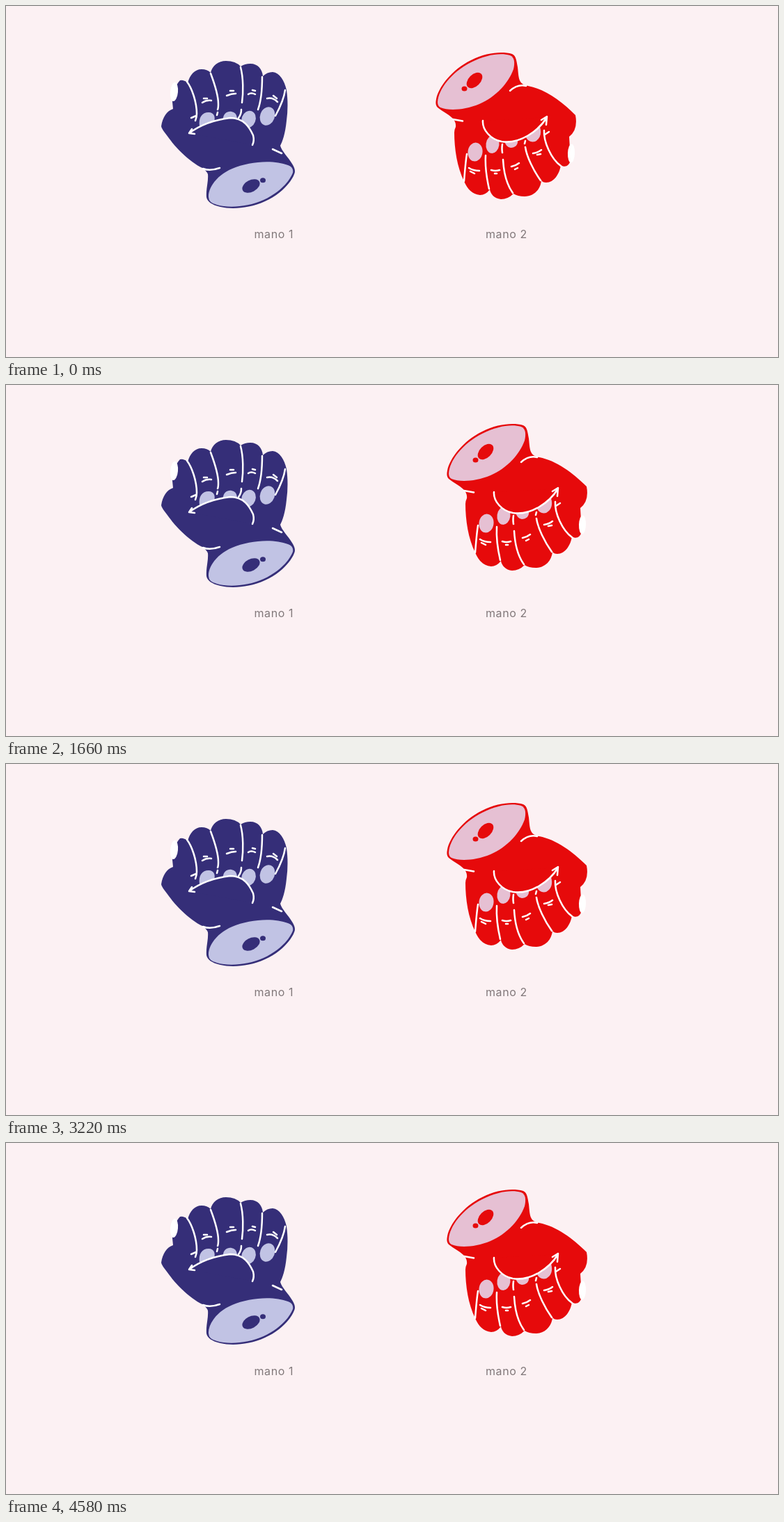
An HTML page that plays this animation: 1109x505 px, repeating every 4610 ms.

```html
<!DOCTYPE html>
<html lang="es">
<head>
<meta charset="utf-8">
<title>Manos</title>
<style>
html, body { margin: 0; width: 100%; height: 100%; overflow: hidden; background: #fcf1f3; }
svg { display: block; width: 1109px; height: 505px; }
.line { fill: none; stroke: #fff; stroke-width: 2.5; stroke-linecap: round; stroke-linejoin: round; }
.nail { fill: #fff; }
#blue { fill: #352e78; }
#blue .skin { fill: #c1c3e4; }
#red { fill: #e60a0b; }
#red .skin { fill: #e6c0d3; }
text { font: 400 16px Inter, sans-serif; letter-spacing: .6px; fill: #81787a; }
</style>
</head>
<body>
<svg viewBox="0 0 1109 505">
  <g id="blue">
    <path d="M250 107Q257 106 261 111C264 99 271 91 281 91Q289 91 294 96C296 86 305 79 316 79Q330 79 337 87Q343 83 351 83C362 83 368 91 369 101Q375 95 383 95C393 96 400 107 403 121C405 135 405 150 403 165C401 185 397 195 394 201C396 209 406 218 411 227C415 233 416 238 414 242C410 253 395 271 372 281C350 291 325 293 308 289C295 286 289 281 288 275C287 264 291 252 290 242Q288 237 282 233C265 225 245 205 237 194C229 183 224 178 223 173C225 160 231 151 240 148L239 138C240 125 244 113 250 107Z"/>
    <ellipse class="nail" cx="241.500" cy="123.500" rx="5.500" ry="13.500" transform="rotate(5 241.500 123.500)"/>
    <path class="skin" d="M291 275C290 262 303 243 325 234C350 223 385 221 405 229C411 231 413 235 412 240C407 253 392 269 370 279C348 289 320 291 303 286Q291 283 291 275Z"/>
    <ellipse cx="352" cy="259" rx="13.500" ry="8.500" transform="rotate(-28 352 259)"/>
    <ellipse cx="369" cy="250.700" rx="4" ry="3.500"/>
    <g class="skin">
      <path d="M278 173C276 160 282 153 291 153C299 153 301 160 299 166Z"/>
      <path d="M312 162C312 155 318 151 324 152Q331 153 332 161L324 164Z"/>
      <ellipse cx="348.500" cy="163" rx="10" ry="12.500" transform="rotate(20 348.500 163)"/>
      <ellipse cx="375.500" cy="158.500" rx="10.500" ry="13.500" transform="rotate(20 375.500 158.500)"/>
    </g>
    <path d="M263 183C282 169 305 163 322 161C342 161 350 175 355 186Q357 194 354 200Z"/>
    <g class="line">
      <path d="M263 183C282 169 305 163 322 161C342 161 350 175 355 186Q357 194 354 200M267 177L263 183L271 184"/>
      <path d="M260 109C267 118 274 138 274 155Q274 160 272 165M266 161L273 158"/>
      <path d="M294 97C300 113 305 130 305 141Q305 147 304 149M304 153L303 157M337 88C341 103 341 125 339 139M338 149Q338 156 334 161"/>
      <path d="M368 102C368 120 366 138 362 149M401 121C399 135 393 147 387 158"/>
      <path d="M282 139Q288 135 295 136M284 133L289 133M317 129Q324 126 330 126M322 122L327 122M348 127Q352 124 358 127M354 121L358 122M375 133Q383 131 390 138M384 129L389 133"/>
      <path d="M383 206L396 212M283 234Q293 238 307 233"/>
    </g>
  </g>
  <g id="red">
    <path d="M620 146C617 143 617 139 618 134C621 117 641 91 668 78C690 67 712 65 727 69C733 72 733 78 735 88C736 97 736 104 739 109Q742 114 750 115C775 120 798 137 818 157Q822 178 809 188L811 222C809 230 803 233 797 229C795 242 787 254 776 254Q771 254 769 251C768 264 758 274 745 274Q735 274 729 270Q721 278 711 278C701 277 696 270 695 264Q689 272 681 272C669 271 662 262 658 252C648 232 644 205 644 182Q644 178 646 174Q647 167 641 161C635 155 627 152 620 146Z"/>
    <ellipse class="nail" cx="812" cy="212" rx="5" ry="13.500" transform="rotate(2 812 212)"/>
    <path class="skin" d="M620 138C621 120 640 95 668 81C690 70 710 67 724 71C731 74 731 82 729 91C722 110 705 130 680 141C658 150 636 151 624 146Q620 144 620 138Z"/>
    <ellipse cx="673" cy="107" rx="13.500" ry="8.500" transform="rotate(-45 673 107)"/>
    <ellipse cx="658.500" cy="119" rx="4" ry="3.500"/>
    <g class="skin">
      <ellipse cx="674" cy="210" rx="10.500" ry="13.500" transform="rotate(8 674 210)"/>
      <ellipse cx="699" cy="199" rx="9.500" ry="13" transform="rotate(8 699 199)"/>
      <path d="M716 194L735 193C736 200 731 204 725 204Q718 203 716 194Z"/>
      <path d="M747 189L767 174C770 184 767 191 760 195Q751 197 747 189Z"/>
    </g>
    <path d="M685 165C684 178 696 192 712 195C738 199 765 180 777 160Z"/>
    <g class="line">
      <path d="M685 165C684 178 696 192 712 195C738 199 765 180 777 160M769 164L777 159L776 171"/>
      <path d="M773 179C772 195 783 220 797 230M774 185L780 181"/>
      <path d="M746 203C748 217 758 237 768 251M746 194L745 198M714 221C715 240 720 258 728 269M713 199Q712 205 713 211"/>
      <path d="M689 215C688 232 691 250 694 263M662 213C660 225 659 240 658 252"/>
      <path d="M665 233Q671 237 680 237M667 238L673 241M697 236Q703 238 709 236M702 241L705 241M726 231Q732 230 737 226M731 235L735 233M757 212Q764 211 769 207M763 214L768 213"/>
      <path d="M642 163L656 165.500M724 122Q735 112 747 115"/>
    </g>
  </g>
  <text x="356.500" y="334">mano 1</text>
  <text x="689" y="334">mano 2</text>
</svg>
<script>
const LOOP = 4610, CYCLE = 1560, SHIFT = 760, PAUSE = 100;
const blue = document.getElementById('blue');
const red = document.getElementById('red');

const ramp = (p, from, to) => Math.min(1, Math.max(0, (p - from) / (to - from)));
// Goes 0 to 1 between a and b, and back to 0 between c and d
const pulse = (p, a, b, c, d) => ramp(p, a, b) - ramp(p, c, d);

function place(el, x, y) {
  el.setAttribute('transform', `translate(${x} ${y})`);
}

function draw(t) {
  if (t >= CYCLE && t < CYCLE + PAUSE) t = CYCLE;
  const p = (t + SHIFT) % CYCLE;

  // Each hand shakes twice per cycle: blue left and down, red right and up
  place(blue,
    -16 * (pulse(p, 200, 340, 480, 640) + pulse(p, 890, 1000, 1090, 1210)),
    10 * (pulse(p, 690, 725, 725, 760) + pulse(p, 1240, 1390, 1390, 1430)) - pulse(p, 640, 655, 690, 700));
  place(red,
    16 * (pulse(p, 320, 460, 690, 755) + pulse(p, 785, 850, 1375, 1535)),
    -11 * (pulse(p, 200, 320, 460, 600) + pulse(p, 785, 830, 1050, 1200)));
}

const start = performance.now();
function tick() {
  draw((performance.now() - start) % LOOP);
  requestAnimationFrame(tick);
}
draw(0);
requestAnimationFrame(tick);
</script>
</body>
</html>
```
